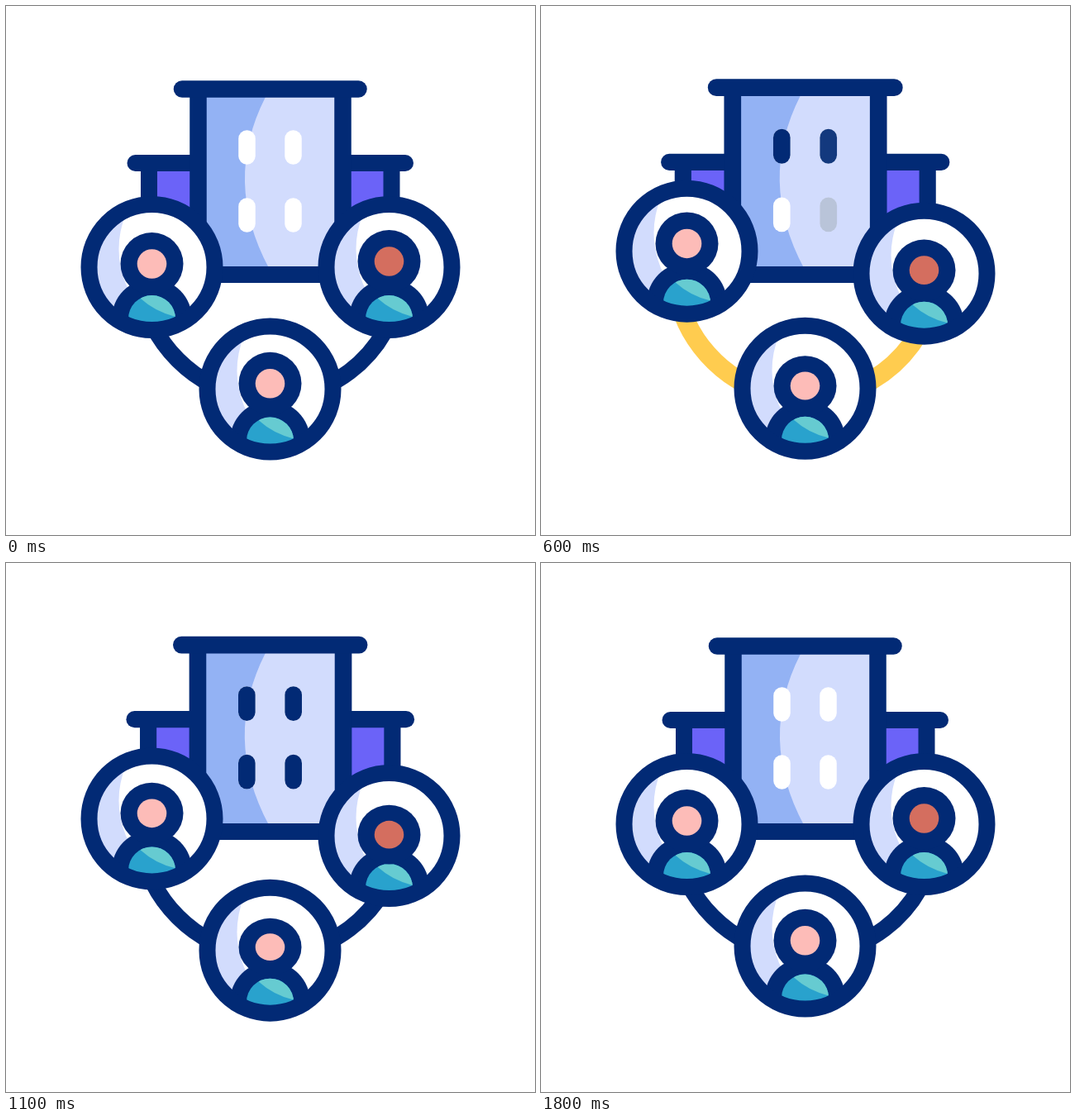
Animation of 640 by 640 pixels, one loop 2180 ms. Source, as an HTML page with a canvas:

```html
<!DOCTYPE html>
<html lang="en">
<head>
<meta charset="utf-8">
<title>Connected team</title>
<style>
html, body { margin: 0; width: 100%; height: 100%; overflow: hidden; background: #fff; }
canvas { display: block; width: 100vw; height: 100vh; object-fit: contain; }
</style>
</head>
<body>
<canvas id="stage" width="640" height="640"></canvas>
<script>
const ctx = document.getElementById('stage').getContext('2d');
const LOOP = 2180;
const NAVY = '#022a75', YELLOW = '#ffcc4f', PALE = '#d2dcfd', BLUE = '#93b2f4',
  PURPLE = '#6b63f8', TEAL = '#29a2cd', MINT = '#66cbd1';

// [time, value] keys, eased with a cosine between neighbours
const SCALE = [[180, 1], [340, .96], [840, 1.05], [1340, .968], [1780, 1]];
const BOUNCE = [[305, 0], [410, 11], [578, -20], [845, 14.5], [1150, -8], [1380, 1], [1500, 0]];
const NOD = [[300, 0], [405, 14], [615, -25], [850, 20], [1160, -12], [1400, 1], [1500, 0]];
const STRETCH = [[300, 0], [450, -.05], [600, 0], [700, .08], [940, -.09], [1250, .035], [1450, 0]];

const PEOPLE = [
  { x: 176.5, y: 316, head: -4, delay: 0, skin: '#fdbcb8' },
  { x: 463.5, y: 316, head: -7, delay: 230, skin: '#d46e5f' },
  { x: 319.5, y: 463.5, head: -6.7, delay: 120, skin: '#fdbcb8' }
];

const WINDOWS = [
  { x: 291.5, y: 171, on: [185, 450], off: [1580, 1800] },
  { x: 347.5, y: 171, on: [355, 620], off: [1540, 1760] },
  { x: 347.5, y: 253, on: [530, 790], off: [1500, 1720] },
  { x: 291.5, y: 253, on: [630, 860], off: [1460, 1680] }
];

const clamp = v => Math.min(1, Math.max(0, v));
const ramp = (t, [a, b]) => clamp((t - a) / (b - a));
const smooth = p => p * p * (3 - 2 * p);

function track(keys, t) {
  if (t <= keys[0][0]) return keys[0][1];
  for (let i = 1; i < keys.length; i++) {
    const [t0, v0] = keys[i - 1], [t1, v1] = keys[i];
    if (t < t1) return v0 + (v1 - v0) * (1 - Math.cos(Math.PI * (t - t0) / (t1 - t0))) / 2;
  }
  return keys[keys.length - 1][1];
}

function line(x0, y0, x1, y1, color, width, cap = 'round') {
  ctx.beginPath();
  ctx.moveTo(x0, y0);
  ctx.lineTo(x1, y1);
  ctx.strokeStyle = color;
  ctx.lineWidth = width;
  ctx.lineCap = cap;
  ctx.stroke();
}

function rect(x, y, w, h, color) {
  ctx.fillStyle = color;
  ctx.fillRect(x, y, w, h);
}

function disc(x, y, r, color) {
  ctx.beginPath();
  ctx.arc(x, y, r, 0, 2 * Math.PI);
  ctx.fillStyle = color;
  ctx.fill();
}

function building(t) {
  const s = track(SCALE, t);
  ctx.save();
  ctx.translate(320, 325);
  ctx.scale(s, s);
  ctx.translate(-320, -325);

  rect(173, 190, 294, 130, PURPLE);
  line(173, 190, 173, 320, NAVY, 20, 'butt');
  line(466.5, 190, 466.5, 320, NAVY, 20, 'butt');
  line(156.5, 190, 483, 190, NAVY, 20);

  rect(232, 100, 176, 225, PALE);
  ctx.beginPath();
  ctx.moveTo(232, 100);
  ctx.lineTo(320, 100);
  ctx.lineTo(314, 110);
  ctx.quadraticCurveTo(262, 212, 318, 317);
  ctx.lineTo(232, 325);
  ctx.fillStyle = BLUE;
  ctx.fill();
  line(232.5, 100, 232.5, 325, NAVY, 20.5, 'butt');
  line(407.5, 100, 407.5, 325, NAVY, 20.5, 'butt');
  line(232.5, 325, 407.5, 325, NAVY, 20, 'butt');
  line(213, 100.5, 426.5, 100.5, NAVY, 20.5);

  for (const w of WINDOWS) {
    line(w.x, w.y - 10.5, w.x, w.y + 10.5, '#fff', 20.5);
    ctx.globalAlpha = ramp(t, w.on) * (1 - ramp(t, w.off));
    line(w.x, w.y - 10.5, w.x, w.y + 10.5, NAVY, 20.5);
    ctx.globalAlpha = 1;
  }
  ctx.restore();
}

// The link runs from 180 degrees at the left, through the bottom, to 0 at the right
function link(from, to, color, width) {
  ctx.beginPath();
  ctx.arc(320, 316, 158.5, to * Math.PI / 180, from * Math.PI / 180);
  ctx.strokeStyle = color;
  ctx.lineWidth = width;
  ctx.lineCap = 'round';
  ctx.stroke();
}

function links(t) {
  link(172, 8, NAVY, 20);
  const front = 172 - 164 * smooth(ramp(t, [170, 660]));
  const back = 172 - 164 * smooth(ramp(t, [695, 1180]));
  if (back - front > .5) link(back, front, YELLOW, 23);
}

function person(p, t) {
  const u = t - p.delay;
  const dy = track(BOUNCE, u), q = track(STRETCH, u);
  ctx.save();
  ctx.translate(p.x, p.y + dy);

  ctx.save();
  ctx.beginPath();
  ctx.arc(0, 0, 76, 0, 2 * Math.PI);
  ctx.clip();
  rect(-80, -80, 160, 160, PALE);
  disc(70, -22, 110, '#fff');

  disc(0, 62.5, 48.5, NAVY);
  ctx.save();
  ctx.beginPath();
  ctx.arc(0, 62.5, 28.5, 0, 2 * Math.PI);
  ctx.clip();
  rect(-40, 30, 80, 50, TEAL);
  ctx.beginPath();
  ctx.moveTo(-16, 34);
  ctx.lineTo(-13.5, 38);
  ctx.quadraticCurveTo(4, 54, 29, 60);
  ctx.lineTo(40, 30);
  ctx.fillStyle = MINT;
  ctx.fill();
  ctx.restore();

  ctx.save();
  ctx.translate(0, p.head + track(NOD, u) - dy);
  ctx.scale(1 - Math.max(q, 0), 1 + q);
  disc(0, 0, 38, NAVY);
  disc(0, 0, 17.8, p.skin);
  ctx.restore();
  ctx.restore();

  ctx.beginPath();
  ctx.arc(0, 0, 76, 0, 2 * Math.PI);
  ctx.strokeStyle = NAVY;
  ctx.lineWidth = 20;
  ctx.stroke();
  ctx.restore();
}

function draw(t) {
  rect(0, 0, 640, 640, '#fff');
  building(t);
  links(t);
  for (const p of PEOPLE) person(p, t);
}

const start = performance.now();
function frame() {
  draw((performance.now() - start) % LOOP);
  requestAnimationFrame(frame);
}
frame();
</script>
</body>
</html>
```
